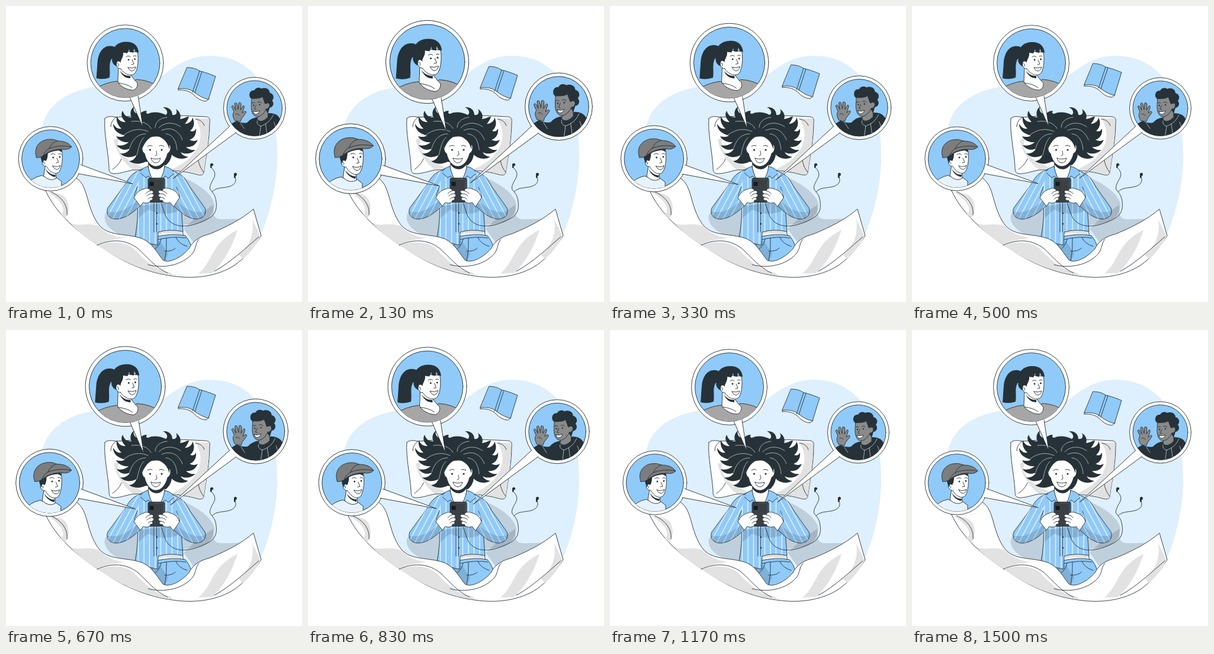
Write an HTML page that moves like this. It is 500x500 px and loops after 1.54 s.

```html
<!DOCTYPE html>
<html lang="en">
<head>
<meta charset="utf-8">
<title>Chatting in bed</title>
<style>
html, body { margin: 0; height: 100%; overflow: hidden; background: #fff; }
svg { display: block; width: 100%; height: 100%; }
path, circle, rect { stroke-linecap: round; stroke-linejoin: round; }
.o { stroke: #263238; stroke-width: .9; }
.l { fill: none; stroke: #263238; stroke-width: .9; }
.thin { fill: none; stroke: #fff; stroke-width: .6; }
.w { fill: #fff; }
.b { fill: #90caf9; }
.d { fill: #263238; }
.g { fill: #e2e2e2; }
.m { fill: #a6a6a6; }
.s { fill: #8a8a8a; }
.shade { fill: #263238; opacity: .17; }
.bubble { transform: scale(var(--s, 1)); }
</style>
</head>
<body>
<svg viewBox="0 0 500 500">
<defs>
  <pattern id="stripes" width="9.5" height="20" patternUnits="userSpaceOnUse">
    <path d="M5 0V20" stroke="#fff" stroke-width="1.1"/>
  </pattern>
  <pattern id="stripesL" href="#stripes" patternTransform="rotate(28)"/>
  <pattern id="stripesR" href="#stripes" patternTransform="rotate(-28)"/>
  <clipPath id="c1"><circle cx="201.5" cy="96.5" r="58"/></clipPath>
  <clipPath id="c2"><circle cx="75.8" cy="258" r="48.5"/></clipPath>
  <clipPath id="c3"><circle cx="419.5" cy="173" r="46.5"/></clipPath>
</defs>

<!-- backdrop -->
<path fill="#deeffd" d="M66 312C50 282 52 225 64 194C78 156 122 136 172 135C218 134 243 131 264 118C288 101 308 84 345 84C396 85 426 113 441 151C455 190 459 228 458 264C455 322 441 360 430 388L300 456L150 400Z"/>

<!-- pillow -->
<path class="w o" d="M167 190C170 186 178 186 186 188C230 184 290 184 336 187C343 187 345 190 344 196C344 224 338 254 334 281C333 287 327 286 320 284C290 276 262 276 214 277C200 280 190 284 180 283C174 282 174 277 174 271C172 242 165 214 167 190Z"/>
<path class="g" d="M343 190C344 224 338 254 334 281C333 286 327 285 320 283C304 279 290 277 276 277C300 268 316 254 324 238C331 222 330 206 320 190Z"/>
<path class="g" d="M192 222C182 240 198 258 222 268L236 275L214 276C202 268 186 248 182 226Z"/>
<path class="l" d="M186 188C180 192 177 198 177 204M334 281C329 275 326 267 325 261M320 191C328 192 333 196 335 202M180 276C188 270 193 264 195 258"/>

<!-- shadows on the sheet -->
<path class="shade" d="M300 290C324 300 350 318 352 336C351 352 340 362 330 366L286 372L290 320Z"/>
<path class="shade" d="M174 346C160 352 166 374 190 385L222 390V340Z"/>
<path class="shade" d="M300 376C326 352 338 344 350 336C352 352 346 362 372 360C392 360 400 358 404 362L320 404Z"/>

<!-- hair -->
<path class="d" d="M236 263C224 269 214 266 208 262C215 261 219 257 220 252C209 258 199 255 193 249C201 250 207 246 209 241C200 245 192 242 187 235C196 237 203 234 207 230C197 231 189 226 186 220C192 222 198 221 201 219C191 216 181 211 181 199C185 206 190 208 195 207C188 201 186 194 187 186C191 194 195 196 202 196C196 190 193 184 197 177C200 186 205 188 212 188C209 182 210 175 216 170C214 179 219 182 226 183C229 178 234 177 238 177C236 180 237 182 240 182C250 177 262 180 270 184C274 181 273 175 265 171C275 170 281 176 281 184C288 185 290 180 287 174C295 179 296 187 294 191C302 190 307 186 309 187C307 193 304 197 302 199C309 199 315 194 315 188C320 198 317 206 311 211C316 213 319 211 321 207C322 217 317 224 310 226C316 229 321 228 324 226C320 236 312 239 304 238C308 242 313 244 320 243C313 250 302 251 295 247C298 252 302 254 308 255C297 261 286 257 280 251C279 258 276 264 270 269Z"/>
<path class="thin" d="M240 212C226 206 212 208 199 218M236 216C222 216 213 226 209 240M245 207C240 197 226 193 212 195M252 205C252 196 260 189 272 188M258 206C268 195 284 196 295 204M263 210C280 203 292 211 298 226M270 216C283 217 288 230 289 243M233 222C226 228 224 240 221 252"/>

<!-- neck and face -->
<path class="w o" d="M241 260L240 274C232 280 236 292 254 299C272 291 274 281 268 273L267 258Z"/>
<path class="d" d="M241 262C247 273 261 274 267 260L268 267C260 280 247 277 241 268Z"/>
<path class="w o" d="M233 233C229 232 228 246 234 249C237 263 245 271 253 271C262 271 270 262 273 249C280 246 279 232 274 234C272 224 264 219 253 220C243 220 235 224 233 233Z"/>
<path class="d" d="M230 241C230 220 240 213 254 214C269 213 278 224 276 242C274 235 271 228 263 223C257 219 248 219 244 222C237 227 233 234 230 241Z"/>
<circle class="d" cx="243.5" cy="243" r="1.6"/><circle class="d" cx="263" cy="243" r="1.6"/>
<path class="l" d="M239 237Q243 234 247 236M259 236Q263 234 267 237M254 245C254 249 257 252 252 253"/>
<path class="w o" d="M245 257Q253 260 261 257Q259 265 253 265Q247 265 245 257Z"/>

<!-- shorts and belly -->
<path class="w o" d="M256 372H297L300 392L256 394Z"/>
<path class="g" d="M256 380Q282 374 298 382L296 386Q275 382 256 386Z"/>
<path class="b o" d="M252 390Q282 383 303 388C310 396 314 406 313 414C302 426 288 432 268 432C257 428 249 414 245 398Z"/>
<path class="l" d="M254 395Q284 388 304 392M271 392Q272 412 268 431M262 394Q259 406 251 411M287 391Q292 402 306 406M268 414Q280 415 286 409"/>
<path class="shade" d="M245 396L260 397L274 418L268 432Q250 424 245 396Z"/>

<!-- pyjama top -->
<g id="top">
  <path class="b" d="M228 276L240 272Q243 292 254 299Q268 292 270 273L283 279L302 291L296 340L299 381Q276 376 257 382L256 404Q234 400 218 391Q224 360 222 330L214 291Z"/>
  <path fill="url(#stripes)" d="M228 276L240 272Q243 292 254 299Q268 292 270 273L283 279L302 291L296 340L299 381Q276 376 257 382L256 404Q234 400 218 391Q224 360 222 330L214 291Z"/>
  <path class="l" d="M228 276L240 272Q243 292 254 299Q268 292 270 273L283 279L302 291M296 340L299 381Q276 376 257 382L256 404Q234 400 218 391Q224 360 222 330M254 299V382M250 310V382"/>
  <path class="b o" d="M240 271Q230 273 226 281L236 290L241 287L253 302Q243 288 240 271ZM268 271Q279 273 285 282L274 291L269 287L254 302Q266 288 268 271Z"/>
  <path class="shade" d="M225 338L290 330L296 344Q268 358 240 344L224 358Z"/>
  <circle class="d" cx="255" cy="350" r="1.2"/><circle class="d" cx="255" cy="368" r="1.2"/>
</g>
<g id="sleeves">
  <path class="b o" d="M228 277C211 282 207 292 200 303L172 341C168 351 174 360 187 360C202 359 216 348 227 337L217 319L222 305"/>
  <path fill="url(#stripesL)" d="M228 277C211 282 207 292 200 303L172 341C168 351 174 360 187 360C202 359 216 348 227 337L217 319L222 305Z"/>
  <path class="shade" d="M171 347C171 356 177 360 187 360C202 359 216 348 227 337L221 328C208 342 188 352 171 347Z"/>
  <path class="b o" d="M283 279C300 284 305 296 311 306L336 341C340 352 332 360 320 360C306 358 296 350 283 337L294 321L288 306"/>
  <path fill="url(#stripesR)" d="M283 279C300 284 305 296 311 306L336 341C340 352 332 360 320 360C306 358 296 350 283 337L294 321L288 306Z"/>
  <path class="shade" d="M337 346C338 356 330 360 320 360C306 358 296 350 283 337L289 329C302 344 321 352 337 346Z"/>
</g>

<!-- earphones -->
<path class="l" d="M347 273C352 278 355 284 351 291C347 298 343 305 345 310C350 316 354 320 355 331C357 345 352 355 338 361C316 372 292 377 277 364C268 357 268 347 262 333M387 289C390 296 387 302 377 305C365 308 355 306 348 314"/>
<path class="d" d="M345 267q3-3 5 0q1 3-2 3l-1 4l-2-1zM385 283q4-3 5 1q0 3-2 3l-1 4l-2-1z"/>

<!-- phone and hands -->
<rect x="240" y="290.500" width="28" height="41" rx="3" fill="#3a4043" class="o"/>
<rect x="242.500" y="297" width="7" height="7" rx="1" fill="#151b1e"/>
<path d="M251 292H265M266 294V328" stroke="#6c7275" stroke-width=".6"/>
<path class="w o" d="M227 338L216 324C220 315 226 311 233 309C238 306 243 309 244 312C249 311 250 315 247 317C251 318 250 322 247 323C249 326 247 329 244 328C244 333 237 334 232 332Z"/>
<path class="l" d="M244 312Q239 313 236 317M247 317Q241 317 238 321M247 323Q242 323 240 326"/>
<path class="w o" d="M283 339L293 324C290 315 285 311 277 309C270 306 265 308 264 312C257 310 255 314 260 317C256 319 257 322 261 323C257 325 260 330 264 328C265 333 273 334 277 332Z"/>
<path class="l" d="M264 312Q269 313 272 317M260 317Q267 317 270 321M261 323Q266 323 268 326"/>

<!-- blanket -->
<path class="w o" d="M67 312C78 302 103 289 118 290C130 298 133 309 138 326C143 345 149 360 158 371C174 388 196 384 224 391C244 396 252 412 265 429C276 436 297 424 309 410C317 394 330 389 344 385C371 374 397 361 418 343L431 388C418 409 403 426 386 438C358 456 322 461 289 457C240 452 198 433 164 409C121 383 84 350 67 312Z"/>
<path class="g" d="M69 313C82 316 98 316 103 328C108 340 106 350 100 359L93 352C103 343 91 326 69 313Z"/>
<path class="g" d="M104 362C116 377 139 363 157 372C169 384 183 390 201 392C181 394 167 397 154 403C137 393 119 379 104 362Z"/>
<path class="g" d="M155 404C177 396 205 398 218 412C234 428 254 448 277 450L285 456C238 450 196 433 155 404Z"/>
<path class="g" d="M325 452C351 430 345 402 391 378C384 401 371 430 348 451ZM393 420C409 409 420 388 416 360L430 389C421 407 410 419 401 427Z"/>
<path class="l" d="M154 404C174 395 199 392 222 409C239 424 253 443 273 451M240 437C266 444 298 438 315 418C321 411 320 399 326 394M352 448C379 434 409 405 427 390M76 314C92 321 105 335 103 353"/>

<!-- book -->
<g id="book">
  <path class="w o" d="M291 142Q307 141 316 149Q327 161 338 161L343 157L340 151L319 139L294 138Z"/>
  <path class="b o" d="M306 104Q319 104 327 110Q337 112 354 119L342 158Q329 155 317 145Q307 138 291 140Z"/>
  <path class="l" d="M327 110L315 146M331 111L319 147"/>
</g>

<!-- friend with a ponytail -->
<g class="bubble" style="transform-origin:201.500px 118.500px">
  <circle class="w o" cx="201.500" cy="96.500" r="64"/>
  <path class="w o" d="M209 154L231 204L223 152"/>
  <circle class="b o" cx="201.500" cy="96.500" r="58"/>
  <g clip-path="url(#c1)">
    <path class="m o" d="M150 140Q168 129 187 127Q204 137 220 124Q242 125 258 137V165H150Z"/>
    <path class="d" d="M183 69C167 64 157 76 155 94L153 122Q164 125 175 121C177 110 173 100 178 90L190 84Z"/>
    <path class="w o" d="M190 104L189 128C193 136 205 142 215 142C223 139 224 129 218 126L210 116Z"/>
    <path class="d" d="M192 109Q200 119 210 118L210 122Q199 123 192 109Z"/>
    <path class="w o" d="M193 76L222 78C224 90 223 105 218 113C213 120 200 116 194 106C186 107 183 92 191 93Z"/>
    <path class="d" d="M180 88C178 71 187 62 201 61C215 60 223 67 224 79L219 78L216 72L215 79L209 78L208 73L205 80L198 79C199 87 193 91 194 96C190 91 186 92 187 102C180 99 178 92 180 88Z"/>
    <circle class="d" cx="207" cy="91" r="1.400"/><circle class="d" cx="217.500" cy="90" r="1.400"/>
    <path class="l" d="M203 86Q207 83 210 86M215 85Q218 83 220 85M213 91L216 98L212 99M188 97Q192 98 190 102M190 130Q206 132 213 138"/>
    <path class="w o" d="M206 104Q213 106 219 103Q217 110 212 110Q208 109 206 104Z"/>
  </g>
</g>

<!-- friend with a cap -->
<g class="bubble" style="transform-origin:117px 258px">
  <circle class="w o" cx="75.800" cy="258" r="54"/>
  <path class="w o" d="M126 268L213 300L122 283"/>
  <circle class="b o" cx="75.800" cy="258" r="48.500"/>
  <g clip-path="url(#c2)">
    <path fill="#e6f3fe" class="o" d="M34 303Q45 289 61 286Q75 294 86 290L94 296V312H34Z"/>
    <path class="w o" d="M67 268L64 287Q75 297 85 291L84 280Z"/>
    <path class="d" d="M67 275Q75 286 84 285L83 289Q71 286 67 275Z"/>
    <path class="w o" d="M66 246L94 240C97 256 95 272 90 280C83 286 74 280 69 271C60 271 58 258 66 259Z"/>
    <path class="d" d="M59 250L93 240L95 247L89 244Q78 245 71 249Q71 257 68 262Q63 258 63 266Q58 258 59 250Z"/>
    <path class="o" fill="#7d7d7d" d="M52 256C47 242 54 229 69 226Q79 224 87 228Q104 228 111 238Q106 244 94 242Q77 242 66 251Q59 257 52 256Z"/>
    <path class="l" d="M87 228Q78 230 73 241Q66 245 63 254M73 241Q88 234 111 238"/>
    <circle class="d" cx="80" cy="256" r="1.400"/><circle class="d" cx="91" cy="255" r="1.400"/>
    <path class="l" d="M76 251Q80 248 83 251M89 250Q92 248 94 251M86 257L89 264L85 265M63 263Q67 264 65 267"/>
    <path class="w o" d="M79 270Q86 273 92 269Q90 277 85 276Q81 275 79 270Z"/>
  </g>
</g>

<!-- waving friend -->
<g class="bubble" style="transform-origin:377px 206px">
  <circle class="w o" cx="419.500" cy="173" r="52"/>
  <path class="w o" d="M378 203L283 291L388 214"/>
  <circle class="b o" cx="419.500" cy="173" r="46.500"/>
  <g clip-path="url(#c3)">
    <path class="d" d="M374 203L389 194Q399 199 407 197Q414 189 425 188L444 181Q458 181 463 192L468 222H380Z"/>
    <path class="s o" d="M425 183L424 192Q431 199 442 188V174Z"/>
    <path class="d" d="M412 155C409 148 413 142 419 143C422 137 429 138 431 140C438 137 445 141 445 147C452 149 453 156 449 160C454 166 449 172 445 172L442 182L434 168Z"/>
    <path class="s o" d="M415 156Q427 158 434 153Q436 160 439 165Q444 162 445 168Q444 174 439 174Q435 184 426 187C417 188 414 179 414 170Z"/>
    <path class="d" d="M413 157Q423 158 432 152L437 166L441 164L442 152L430 146Z"/>
    <path class="s o" d="M386 193C382 186 383 181 385 179L381 170Q383 167 385 170L388 176L386 165Q389 162 390 166L392 175L393 164Q396 162 397 166L396 176L400 169Q403 168 402 172L399 181L403 178Q407 178 404 182L398 190L396 195Z"/>
    <path class="thin" d="M424 194Q422 200 430 203Q445 198 451 184M430 203L428 218M438 199L440 214M396 198L402 207M452 196Q456 204 455 216"/>
    <circle class="d" cx="418" cy="168" r="1.200"/><circle class="d" cx="428" cy="167" r="1.200"/>
    <path class="l" d="M415 164Q418 162 420 164M425 163Q429 161 431 164M422 168L419 174L422 175M388 183Q392 181 394 185"/>
    <path class="w o" d="M417 178Q423 180 428 177Q426 183 421 183Q418 182 417 178Z"/>
  </g>
</g>
</svg>
<script>
const LOOP = 1540, CYCLE = 1500, LEAD = 10;
const beatKeys = [[0, 1], [.1, 1.1], [.3, 1], [.4, 1], [.5, 1.1], [.6, 1], [1, 1]];
const svg = document.querySelector("svg");
const book = document.getElementById("book");

function track(keys, p) {
  const i = Math.max(1, keys.findIndex(([at]) => at >= p));
  const [[p0, v0], [p1, v1]] = [keys[i - 1], keys[i]];
  return v0 + (v1 - v0) * (p - p0) / (p1 - p0);
}

function draw() {
  const p = Math.min(1, (performance.now() % LOOP + LEAD) / CYCLE);
  const lift = 10 * (1 - Math.abs(2 * p - 1));
  svg.style.setProperty("--s", track(beatKeys, p));
  book.setAttribute("transform", `translate(0 ${-lift})`);
  requestAnimationFrame(draw);
}
draw();
</script>
</body>
</html>
```
